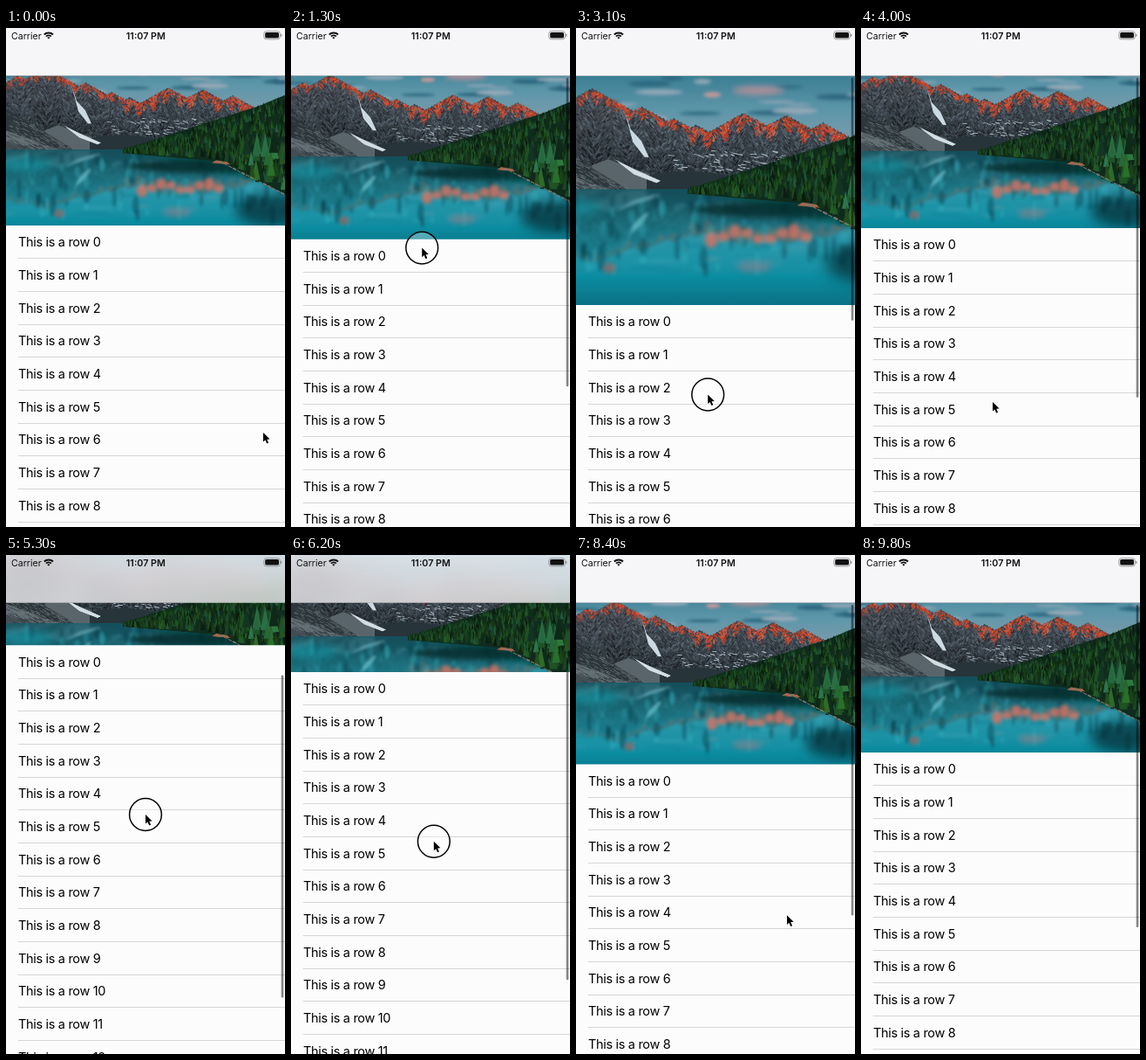
An HTML page with a canvas for the animation above (9900 ms loop, 320 by 571 pixels).

```html
<!DOCTYPE html>
<html lang="en">
<head>
<meta charset="utf-8">
<title>Stretchy header list</title>
<style>
  html, body { margin: 0; height: 100%; overflow: hidden; background: #fcfcfd; }
  canvas { display: block; width: 320px; height: 571px; }
</style>
</head>
<body>
<canvas id="stage"></canvas>
<script>
const W = 320, H = 571, LOOP = 9900, STEP = 100;
const NAV = 54.6, REST = 226, ROW = 37.67;
const PHOTO_TOP = 33.3, PHOTO_H = 213.3, WATER = 139;

// Pointer stops: time, x, y
const STOPS = [
  [0, 295, 463], [1000, 150, 222], [2200, 151.5, 411], [4000, 151, 428],
  [5300, 160, 297], [7000, 167, 353.5], [8200, 180, 479], [8800, 419, 222]
];
const DRAGS = [{ down: 1000, up: 3450 }, { down: 4200, up: 8200 }];
const PEAKS = [[14, 54], [45, 45], [91, 62], [121, 73], [142, 79], [186, 68], [226, 70], [260, 77]];

const stage = document.getElementById('stage');
const ratio = Math.max(1, window.devicePixelRatio || 1);
stage.width = W * ratio;
stage.height = H * ratio;
const ctx = stage.getContext('2d');

const clamp = (v, lo, hi) => Math.min(hi, Math.max(lo, v));
const mix = (a, b, u) => a + (b - a) * u;
const smooth = u => u * u * (3 - 2 * u);

let seed = 77;
const rnd = (lo = 0, hi = 1) => {
  seed = (seed * 16807) % 2147483647;
  return mix(lo, hi, seed / 2147483647);
};

// Outlines of the landscape
const ridge = x => Math.min(...PEAKS.map(([px, py]) => py + Math.abs(x - px) * .55)) + .8 * Math.sin(x * 1.9);
const hill = x => WATER - (x - 134) * .32 - Math.max(0, x - 290) * .1;
const shore = x => 143 + (x - 134) * .085 + Math.max(0, x - 245) * .42;
const scree = x => 92 + x * .6;

function layer() {
  const c = document.createElement('canvas');
  c.width = W * 2;
  c.height = Math.round(PHOTO_H * 2);
  const g = c.getContext('2d');
  g.scale(2, 2);
  g.translate(0, -PHOTO_TOP);
  return g;
}

function poly(g, color, ...points) {
  g.beginPath();
  for (let i = 0; i < points.length; i += 2) g.lineTo(points[i], points[i + 1]);
  g.closePath();
  g.fillStyle = color;
  g.fill();
}

function area(g, color, x0, x1, top, bottom) {
  g.beginPath();
  for (let x = x0; x <= x1; x++) g.lineTo(x, top(x));
  for (let x = x1; x >= x0; x--) g.lineTo(x, bottom(x));
  g.fillStyle = color;
  g.fill();
}

function gradient(g, y0, y1, ...colors) {
  const fill = g.createLinearGradient(0, y0, 0, y1);
  colors.forEach((c, i) => fill.addColorStop(i / (colors.length - 1), c));
  return fill;
}

function blob(g, color, x, y, rx, ry, blur) {
  g.save();
  g.filter = `blur(${blur}px)`;
  g.fillStyle = color;
  g.beginPath();
  g.ellipse(x, y, rx, ry, 0, 0, 7);
  g.fill();
  g.restore();
}

function chip(g, color, x, y, dx, dy, width) {
  g.strokeStyle = color;
  g.lineWidth = width;
  g.beginPath();
  g.moveTo(x, y);
  g.lineTo(x + dx, y + dy);
  g.stroke();
}

function tree(g, x, y, h, light) {
  poly(g, `hsl(${rnd(110, 150)} 45% ${light}%)`, x, y - h, x + h * .2, y, x - h * .2, y);
}

function paintLand(g) {
  const floor = () => WATER;
  g.fillStyle = gradient(g, 33, 100, '#3b7f94', '#5f97aa', '#7f9dab');
  g.fillRect(0, 33, W, 110);
  for (let i = 0; i < 26; i++) {
    const tone = i % 2 ? '#2d6880' : '#93a9b8';
    blob(g, tone, rnd(0, W), rnd(34, 74), rnd(8, 26), rnd(1, 3), 3);
  }
  blob(g, '#c79a9a', 157, 51, 8, 2.5, 3);
  blob(g, '#b08f9a', 200, 47, 24, 4, 6);

  // Rock chips: red where the sun reaches the top, grey below
  area(g, gradient(g, 46, 138, '#4d4a50', '#3b444b', '#222e34'), 0, W, ridge, floor);
  for (let i = 0; i < 7500; i++) {
    const x = rnd(0, 300), top = ridge(x), depth = rnd() ** 1.2 * (WATER - top);
    const sunny = (x > 130 ? 13 : 8) * (.75 + .4 * Math.sin(x * .42));
    const lit = depth < sunny && rnd() < .8;
    const color = lit
      ? `hsl(${rnd(4, 16)} 66% ${rnd(38, 60)}%)`
      : `hsl(${rnd(195, 225)} 12% ${clamp(32 - depth * .2 + rnd(-14, 16), 8, 55)}%)`;
    chip(g, color, x, top + depth, Math.sin(x * .2) > 0 ? 2 : -2, rnd(1, 4), rnd(.5, 1.4));
  }

  // Snow gullies, broken ledges and the scree on the left
  poly(g, '#cbd9e2', 76, 68, 81, 83, 91, 94, 98, 109, 94, 109, 83, 95);
  for (let i = 0; i < 60; i++) {
    chip(g, '#a9b8c2', rnd(115, 235), rnd(103, 121), rnd(2, 7), rnd(0, 2), rnd(.4, 1.2));
  }
  area(g, '#59656b', 45, 136, x => 111 + Math.abs(x - 60) * .36, floor);
  area(g, '#27343a', 96, 170, x => 126 - Math.sin((x - 96) / 24) * 4, floor);
  area(g, '#2c363a', 0, 78, scree, floor);
  area(g, '#626f75', 0, 60, x => 117 + x * .36, floor);
  area(g, '#424e53', 0, 40, x => 129 + x * .25, floor);
  for (let i = 0; i < 500; i++) {
    const x = rnd(0, 90), y = rnd(scree(x), WATER);
    if (y < WATER) chip(g, `hsl(200 9% ${rnd(16, 48)}%)`, x, y, 4, 2, .6);
  }
  poly(g, '#d2dde4', 66, 111, 86, 121, 109, 131, 105, 133, 84, 125);
  area(g, gradient(g, 78, 150, '#1f3a2c', '#17402a', '#113022'), 134, W, hill, floor);
}

function paintForest(g) {
  area(g, '#0f2c1e', 134, W, hill, shore);
  for (let row = .05; row <= 1; row += .05) {
    for (let i = 0; i < 48; i++) {
      const x = rnd(136, 324), y = mix(hill(x) + 3, shore(x), row);
      tree(g, x, y, 4 + (x - 134) * .03 + row * 4, rnd(7, 25));
    }
  }
  for (let i = 0; i < 40; i++) {
    const x = rnd(270, 322);
    tree(g, x, Math.min(shore(x), rnd(140, 186)), rnd(14, 28), rnd(10, 33));
  }
  poly(g, '#a8664a', 236, 154, 241, 151, 254, 153, 257, 156);
  for (let x = 245; x < W; x += 5) chip(g, '#77776c', x, shore(x), 4, 2, rnd(.5, 2));
}

function paintPhoto() {
  const land = layer(), g = layer();
  paintLand(land);
  g.drawImage(land.canvas, 0, PHOTO_TOP, W, PHOTO_H);
  g.fillStyle = gradient(g, WATER, 247, '#125460', '#128796', '#1296a8', '#0b7185');
  g.fillRect(0, WATER, W, 110);

  // Mirror of the land, squeezed and softened
  g.save();
  g.beginPath();
  g.rect(0, WATER, W, 110);
  g.clip();
  g.translate(0, WATER);
  g.scale(1, -.74);
  g.translate(0, -WATER);
  g.globalAlpha = .7;
  g.filter = 'blur(3px)';
  g.drawImage(land.canvas, 0, 0, W * 2, (WATER - PHOTO_TOP) * 2, 0, PHOTO_TOP, W, WATER - PHOTO_TOP);
  g.restore();
  g.fillStyle = gradient(g, WATER, 247, 'rgba(0,105,125,.35)', 'rgba(0,150,170,.4)', 'rgba(10,150,170,.65)', '#0b7185');
  g.fillRect(0, WATER, W, 110);

  for (let i = 0; i < 90; i++) {
    const tone = i % 2 ? 'rgba(60,185,200,.3)' : 'rgba(0,45,60,.35)';
    blob(g, tone, rnd(0, W), rnd(145, 215), rnd(1, 4), rnd(4, 12), 3);
  }
  for (let x = 156; x < 245; x += 11) {
    blob(g, 'rgba(222,112,96,.8)', x, 182 + 4 * Math.sin(x * .13), 6, rnd(4, 8), 4);
  }
  blob(g, 'rgba(150,125,135,.5)', 196, 211, 16, 5, 6);
  blob(g, 'rgba(190,85,75,.55)', 61, 212, 6, 5, 4);
  blob(g, 'rgba(25,160,175,.55)', 22, 156, 32, 8, 9);
  blob(g, 'rgba(4,40,48,.7)', 305, 208, 42, 18, 13);
  blob(g, 'rgba(5,42,42,.8)', 225, 158, 85, 8, 6);
  paintForest(g);
  return g.canvas;
}

const photo = paintPhoto();

function pointer(t) {
  const next = STOPS.findIndex(stop => stop[0] > t);
  const b = STOPS.at(next), a = next < 0 ? b : STOPS[next - 1];
  const u = a === b ? 0 : smooth((t - a[0]) / (b[0] - a[0]));
  return { x: mix(a[1], b[1], u), y: mix(a[2], b[2], u) };
}

const rubber = d => d <= 0 ? d : H * (1 - 1 / (d * .55 / H + 1));

// List offset: positive is stretched, negative is scrolled
function listOffset(t) {
  const drag = DRAGS.findLast(d => t >= d.down);
  if (!drag) return 0;
  const pulled = rubber(pointer(Math.min(t, drag.up)).y - pointer(drag.down).y);
  const w = Math.max(0, t - drag.up) * .0095;
  return pulled * (1 + w) * Math.exp(-w);
}

function clipped(x, y, w, h, paint) {
  ctx.save();
  ctx.beginPath();
  ctx.rect(x, y, w, h);
  ctx.clip();
  paint();
  ctx.restore();
}

function drawPhoto(bottom, offset) {
  const zoom = Math.max(1, (bottom - NAV) / PHOTO_H);
  const w = W * zoom, h = PHOTO_H * zoom, y = (NAV + bottom - h) / 2;
  clipped(0, NAV, W, bottom - NAV, () => ctx.drawImage(photo, (W - w) / 2, y, w, h));

  ctx.fillStyle = '#f6f5f8';
  ctx.fillRect(0, 0, W, NAV);
  clipped(0, 0, W, NAV, () => {
    ctx.globalAlpha = .24 * clamp(-offset / 60, 0, 1);
    ctx.filter = `blur(${16 * ratio}px)`;
    if (offset < -1) ctx.drawImage(photo, -25, y, W + 50, h);
  });
  ctx.fillStyle = 'rgba(0,0,0,.25)';
  ctx.fillRect(0, 54, W, .7);
}

function drawRows(bottom) {
  ctx.font = '14.5px Inter, sans-serif';
  ctx.letterSpacing = '-0.32px';
  ctx.textAlign = 'left';
  for (let i = 0, y = bottom; y < H; i++, y += ROW) {
    ctx.fillStyle = '#000';
    ctx.fillText('This is a row ' + i, 14, y + 24.2);
    ctx.fillStyle = '#d6d6d8';
    ctx.fillRect(13.7, Math.floor(y + ROW), W, 1);
  }
  ctx.letterSpacing = '0px';
}

function pill(x, y, w, h, r) {
  ctx.beginPath();
  ctx.roundRect(x, y, w, h, r);
}

function drawStatus() {
  ctx.fillStyle = ctx.strokeStyle = '#111';
  ctx.font = '10.6px Inter, sans-serif';
  ctx.fillText('Carrier', 6, 12.6);
  ctx.font = '600 10.7px Inter, sans-serif';
  ctx.textAlign = 'center';
  ctx.fillText('11:07 PM', 160.3, 12.6);
  ctx.lineWidth = 2;
  for (let r = 1.2; r < 8; r += 3) {
    ctx.beginPath();
    ctx.arc(48.9, 12.6, r, -Math.PI * .75, -Math.PI * .25);
    ctx.stroke();
  }
  pill(297.2, 5, 15.8, 6.6, 1.6);
  ctx.fill();
  ctx.fillStyle = ctx.strokeStyle = '#888';
  ctx.lineWidth = .8;
  pill(295.8, 3.7, 18.5, 9.2, 2.8);
  ctx.stroke();
  pill(315.2, 6.8, 1.2, 3, .6);
  ctx.fill();
}

function drawScrollbar(offset) {
  ctx.fillStyle = 'rgba(0,0,0,.48)';
  pill(315.7, 57 + Math.max(0, -offset) * .656, 2.6, 369 - Math.max(0, offset), 1.3);
  ctx.fill();
}

function drawPointer(t) {
  const { x, y } = pointer(t);
  ctx.save();
  ctx.translate(x, y);
  if (DRAGS.some(d => t >= d.down && t < d.up)) {
    ctx.beginPath();
    ctx.arc(0, 0, 18.4, 0, 7);
    ctx.fillStyle = 'rgba(255,255,255,.3)';
    ctx.fill();
    ctx.strokeStyle = '#000';
    ctx.lineWidth = 1.5;
    ctx.stroke();
  }
  ctx.strokeStyle = '#fff';
  ctx.lineWidth = 1.6;
  ctx.lineJoin = 'round';
  poly(ctx, '#000', 0, 0, 0, 10.6, 2.4, 8.4, 4.2, 12.6, 6.1, 11.8, 4.3, 7.7, 7.6, 7.5);
  ctx.stroke();
  ctx.fill();
  ctx.restore();
}

function draw(now) {
  const t = Math.floor((now % LOOP) / STEP) * STEP;
  const offset = listOffset(t), bottom = REST + offset;
  ctx.setTransform(ratio, 0, 0, ratio, 0, 0);
  ctx.fillStyle = '#fcfcfd';
  ctx.fillRect(0, 0, W, H);
  drawRows(bottom);
  drawPhoto(bottom, offset);
  ctx.textAlign = 'left';
  drawStatus();
  if (t >= DRAGS[0].down) drawScrollbar(offset);
  drawPointer(t);
}

const start = performance.now();
function tick() {
  draw(performance.now() - start);
  requestAnimationFrame(tick);
}
tick();
</script>
</body>
</html>
```
